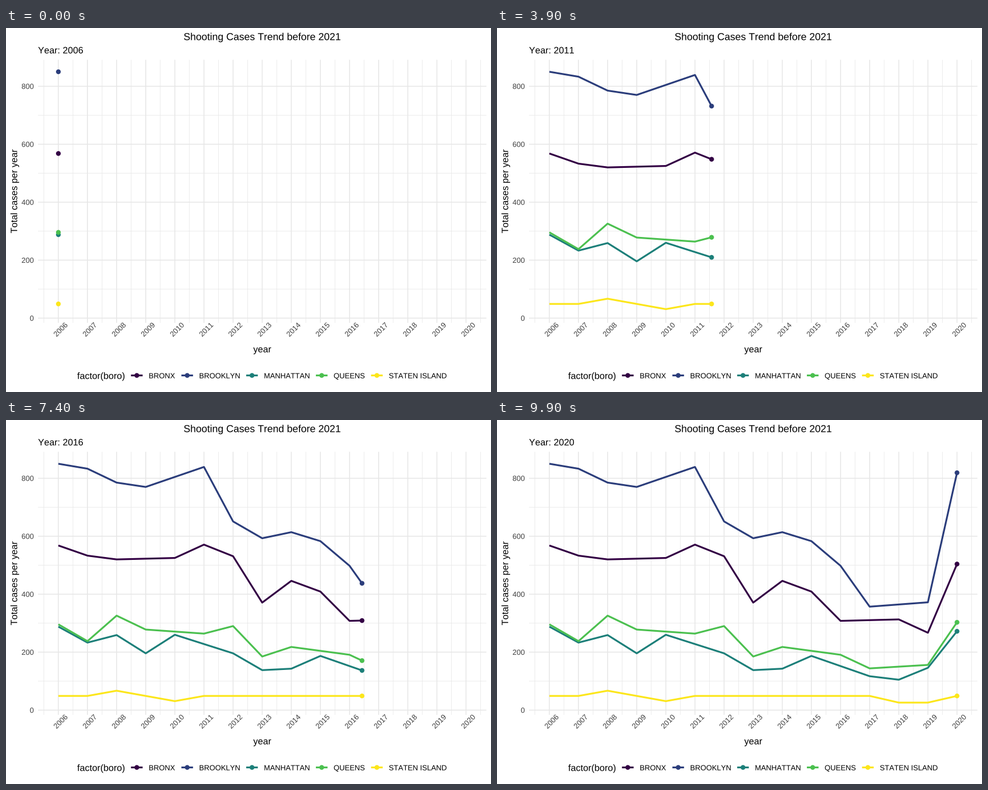
A matplotlib script that plays this animation: 864x648 px, repeating every 10 s.

```python
import matplotlib.pyplot as plt
import numpy as np
from matplotlib.animation import FuncAnimation
from matplotlib.patches import Circle, PathPatch
from matplotlib.textpath import TextPath
from matplotlib.transforms import Affine2D

plt.rcParams.update({
    "font.family": "Liberation Sans",
    "text.kerning_factor": 6,
    "toolbar": "None",
})

W, H, DPI = 864, 648, 72
FRAMES, INTERVAL = 100, 100
FIRST = 2006
YEARS = np.arange(15)
X0, X_STEP = 93.3, 51.87
Y0, Y_STEP = 516.5, 0.516
LEFT, RIGHT, TOP, BOTTOM = 57, 855.75, 56.6, 524.9
MID = (LEFT + RIGHT) / 2
GRID, TICK = "#E7E7E7", "#404040"
LINE_W, DOT_R = 3.2, 4.25
KEY_W, GAP = 25.9, 9
_ = np.nan  # no bend that year


def through(*bends):
    """Yearly values running straight between the bends."""
    bends = np.array(bends, float)
    known = ~np.isnan(bends)
    return np.interp(YEARS, YEARS[known], bends[known])


def ripple():
    """Flat level with one early wave and a late two-year dip."""
    wave = 18 * np.sin(np.pi * (YEARS - 1) / 2) * ((YEARS > 0) & (YEARS < 6))
    dip = 23 * ((YEARS > 11) & (YEARS < 14))
    return 49 + wave - dip


SERIES = [
    ("BRONX", "#330044",
     through(568, 533, 520, _, 525, 571, 531, 371, 446, 409, 308, _, 313, 267, 504)),
    ("BROOKLYN", "#2B3D7B",
     through(850, 833, 785, 770, _, 839, 651, 593, 614, 583, 498, 357, _, 372, 819)),
    ("MANHATTAN", "#1C7F79",
     through(288, 233, 259, 196, 260, _, 196, 138, 143, 187, _, 117, 105, 146, 272)),
    ("QUEENS", "#4BC04F",
     through(296, 238, 326, 278, _, 264, 290, 185, 218, _, 191, 144, _, 156, 303)),
    ("STATEN ISLAND", "#FCE61B", ripple()),
]


def px(year):
    return X0 + X_STEP * np.asarray(year)


def py(cases):
    return Y0 - Y_STEP * np.asarray(cases)


fig = plt.figure(figsize=(W / DPI, H / DPI), dpi=DPI, facecolor="white")
ax = fig.add_axes([0, 0, 1, 1])
ax.set_xlim(0, W)
ax.set_ylim(H, 0)
ax.axis("off")


def glyphs(x, y, text, size=16.5, ha="left", angle=0):
    """Outline of a text whose baseline starts, centres or ends at x, y."""
    path = TextPath((0, 0), text, size=size)
    box = path.get_extents()
    shift = {"left": 0, "center": (box.x0 + box.x1) / 2, "right": box.x1}[ha]
    place = Affine2D().translate(-shift, 0).scale(1, -1)
    return place.rotate_deg(-angle).translate(x, y).transform_path(path)


def label(x, y, text, size=16.5, color="black", ha="left", angle=0):
    shape = PathPatch(glyphs(x, y, text, size, ha, angle), fc=color, lw=0,
                      zorder=3, snap=False)
    return ax.add_patch(shape)


def right_edge(shape):
    return shape.get_path().get_extents().x1


def line(xs, ys, color, width, z):
    return ax.plot(xs, ys, color=color, lw=width, zorder=z, snap=False,
                   solid_capstyle="butt", solid_joinstyle="round")[0]


def dot(x, y, color, z):
    return ax.add_patch(Circle((x, y), DOT_R, fc=color, lw=0, zorder=z, snap=False))


def draw_grid():
    for half in range(-1, 2 * len(YEARS)):
        x, major = px(half / 2), half % 2 == 0
        line([x, x], [TOP, BOTTOM], GRID, 1.6 if major else 0.8, 1)
        if major:
            label(x + 7.1, 539.9, str(FIRST + half // 2), 13.2, TICK, "center", 45)
    for cases in range(0, 900, 100):
        y, major = py(cases), cases % 200 == 0
        line([LEFT, RIGHT], [y, y], GRID, 1.6 if major else 0.8, 1)
        if major:
            label(49.1, y + 4.7, str(cases), 13.2, TICK, "right")


def draw_legend():
    x = right_edge(label(126.8, 624.8, "factor(boro)")) + GAP
    for name, color, _cases in SERIES:
        line([x + 0.1 * KEY_W, x + 0.9 * KEY_W], [618.5] * 2, color, LINE_W, 2)
        dot(x + KEY_W / 2, 618.5, color, 3)
        x = right_edge(label(x + KEY_W + 8.25, 623.6, name, 13.2)) + GAP


draw_grid()
draw_legend()
label(MID, 21.6, "Shooting Cases Trend before 2021", 18, ha="center")
label(MID, 577.4, "year", ha="center")
label(19.9, 290.7, "Total cases per year", ha="center", angle=90)
subtitle = label(LEFT, 45.2, f"Year: {FIRST}")
trails = [line([], [], color, LINE_W, 4) for _name, color, _cases in SERIES]
heads = [dot(0, 0, color, 5) for _name, color, _cases in SERIES]


def elapsed(i):
    """Years revealed: seven steps each, eight for the seventh year."""
    if i <= 42:
        return i / 7
    if i <= 50:
        return 6 + (i - 42) / 8
    return (i - 1) / 7


def update(i):
    t = elapsed(i)
    whole = int(t + 1e-9)
    subtitle.set_path(glyphs(LEFT, 45.2, f"Year: {FIRST + whole}"))
    past = YEARS[YEARS < t]
    for (_name, _color, cases), trail, head in zip(SERIES, trails, heads):
        years = np.append(past, t)
        xs, ys = px(years), py(np.interp(years, YEARS, cases))
        trail.set_data(xs, ys)
        head.center = xs[-1], ys[-1]
    return [subtitle, *trails, *heads]


anim = FuncAnimation(fig, update, frames=FRAMES, interval=INTERVAL,
                     repeat=True, repeat_delay=0, blit=False)
plt.show()
```
